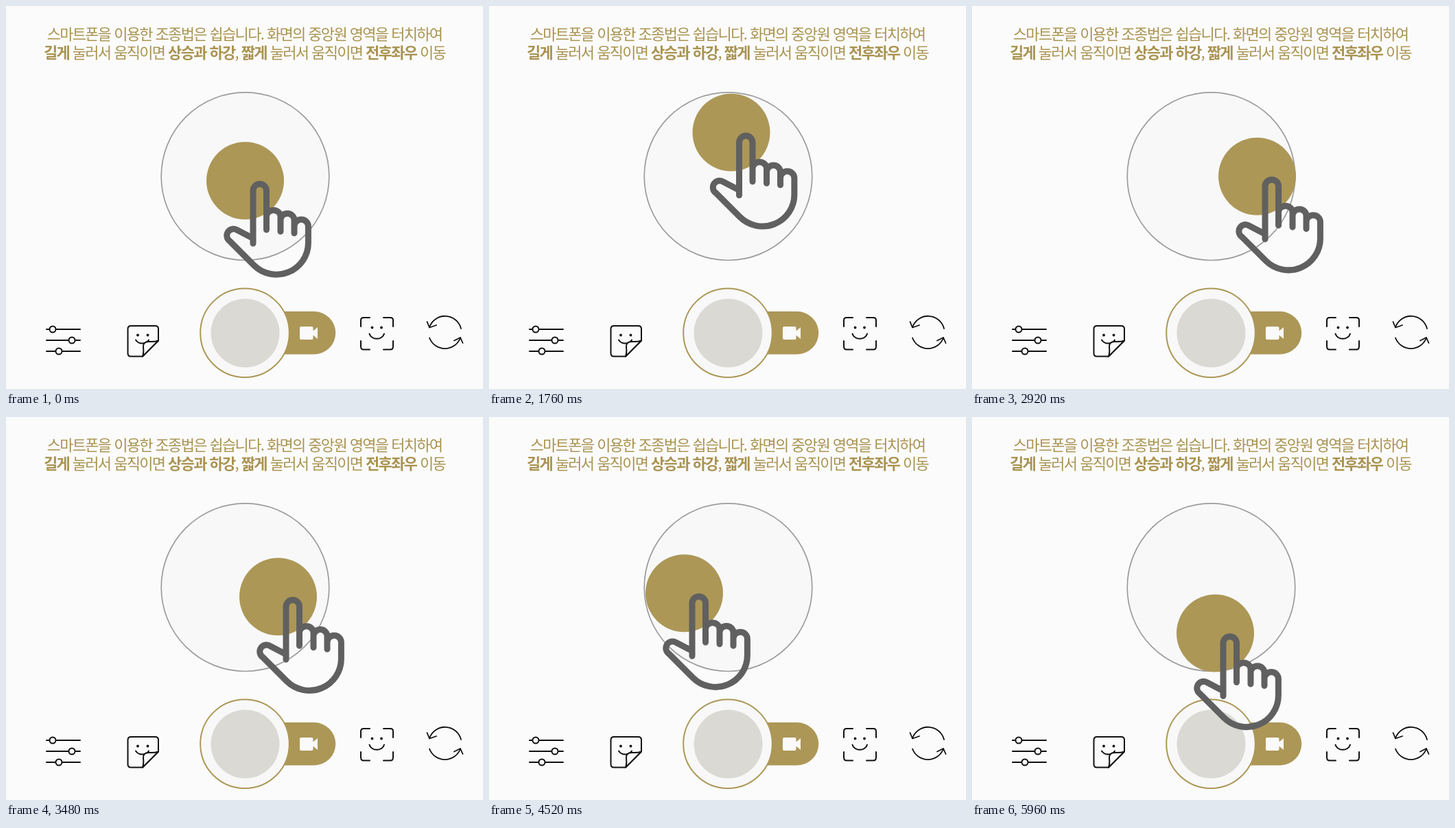
Recreate the animation shown at these times as an HTML page with a canvas. Size 695x558 px, loop 6 s.

```html
<!DOCTYPE html>
<html lang="ko">
<head>
<meta charset="utf-8">
<style>
  html, body { margin: 0; width: 100%; height: 100%; overflow: hidden; background: #fbfbfb; }
  canvas { position: absolute; left: 0; top: 0; }
  p {
    position: absolute; left: 0; top: 26px; width: 695px; margin: 0;
    font: 300 22px/27px "Noto Sans CJK KR", "Noto Sans CJK", "Noto Sans KR", sans-serif;
    letter-spacing: -0.077em; word-spacing: 0.3px;
    text-align: center; white-space: nowrap; color: #a99350;
  }
  b { font-weight: 700; }
</style>
</head>
<body>
<canvas id="stage" width="695" height="558"></canvas>
<p>스마트폰을 이용한 조종법은 쉽습니다. 화면의 중앙원 영역을 터치하여<br><b>길게</b> 눌러서 움직이면 <b>상승과 하강</b>, <b>짧게</b> 눌러서 움직이면 <b>전후좌우</b> 이동</p>
<script>
const ctx = document.getElementById('stage').getContext('2d');
const LOOP = 6000, STEP = 40;
const BG = '#fbfbfb', PALE = '#f8f8f8', GOLD = '#ac9757', INK = '#111', GREY = '#606060';

// time, x, y of the knob
const path = [
  [0, 348.5, 254.5], [680, 345.5, 225], [1280, 344.5, 189.5], [1760, 353, 184.3],
  [1920, 360.5, 188], [2440, 395.7, 222.3], [2560, 402.7, 230.5], [2940, 415.8, 249],
  [3200, 414.5, 258.3], [3480, 396.5, 261.8], [3840, 353.5, 258.7], [4520, 284.5, 256.7],
  [4680, 282.6, 259.5], [5120, 298.5, 278.5], [5760, 349.5, 311.5], [5960, 354.5, 315]
];

// slope at a knot: the parabola through it and its neighbours
function slope(i, k) {
  const d = j => (path[j + 1][k] - path[j][k]) / (path[j + 1][0] - path[j][0]);
  const last = path.length - 1;
  if (i === 0) return d(0) * 0.6;
  if (i === last) return d(last - 1) * 0.5;
  const a = path[i][0] - path[i - 1][0], b = path[i + 1][0] - path[i][0];
  return (d(i - 1) * b + d(i) * a) / (a + b);
}

function knobAt(t) {
  let i = 0;
  while (i < path.length - 2 && t > path[i + 1][0]) i++;
  const h = path[i + 1][0] - path[i][0], u = (t - path[i][0]) / h, v = 1 - u;
  return [1, 2].map(k =>
    v * v * (1 + 2 * u) * path[i][k] + u * u * (3 - 2 * u) * path[i + 1][k] +
    h * u * v * (v * slope(i, k) - u * slope(i + 1, k)));
}

function disc(x, y, r, fill, line, width) {
  ctx.beginPath();
  ctx.arc(x, y, r, 0, 7);
  if (fill) { ctx.fillStyle = fill; ctx.fill(); }
  if (line) { ctx.strokeStyle = line; ctx.lineWidth = width; ctx.stroke(); }
}

function draw(d, line, width, fill) {
  const p = new Path2D(d);
  if (fill) { ctx.fillStyle = fill; ctx.fill(p); }
  if (line) { ctx.strokeStyle = line; ctx.lineWidth = width; ctx.stroke(p); }
}

function sliders() {
  for (const [y, x] of [[471, 68], [487, 96], [503, 77]]) {
    draw(`M59 ${y}H108`, INK, 2);
    disc(x, y, 4.5, BG, INK, 2);
  }
}

function sticker() {
  draw('M199 510.5H182Q177.5 510.5 177.5 506V470.5Q177.5 466 182 466H217.5Q222 466 222 470.5V487.5Z', INK, 2);
  draw('M189 486.5Q192 491.5 198.5 491.500Q205 491.500 208 486.500', INK, 2);
  draw('M199 510.500Q201 505 200 497Q199.500 489 208 489Q217 489.500 222 487.500Z', INK, 2, BG);
  disc(192, 479.5, 1.9, INK);
  disc(206.5, 479.5, 1.9, INK);
}

function shutter() {
  draw('M380 445H449A31.25 31.25 0 0 1 449 507.5H380Z', null, 0, GOLD);
  disc(348, 476.2, 64.8, PALE, GOLD, 2);
  disc(348.5, 476.5, 50, '#dad9d3');
  draw('M430 467H445.5Q447.5 467 447.5 469V473.5L454 468V485L447.5 479.5V484Q447.5 486 445.5 486H430Q428 486 428 484V469Q428 467 430 467Z', null, 0, '#fafafa');
}

function faceScan() {
  draw('M517 467V458Q517 454 521 454H530M550 454H560Q564 454 564 458V467M564 488V496Q564 500.5 560 500.5H550M530 500.5H521Q517 500.5 517 496V488', INK, 2);
  draw('M529.5 477.5A11 9.300 0 0 0 551 477.5', INK, 2);
  disc(533.5, 468.5, 1.9, INK);
  disc(547, 468.5, 1.9, INK);
}

function refresh() {
  draw('M617 468A24 24 0 0 1 663 470M662 483.500A24 24 0 0 1 617 483.500', INK, 1.8);
  draw('M613.5 460L617 468.500L627 465M653 487.5L662 483L665.5 491', INK, 1.8);
}

// outlined hand placed for a knob centred on (348.5, 254.5)
function hand() {
  draw('M360 346V269a9.75 9.75 0 0 1 19.5 0V326M379.5 307a10.25 9.5 0 0 1 20.5 0V328.5M400 312a10 9.7 0 0 1 20 0V331M420 321a10.2 10 0 0 1 20.4 0V345A46.4 46 0 0 1 361 377.500L326 342.500A9.5 9.5 0 0 1 337 326.500L360 338.500', GREY, 9);
}

function render(time) {
  const t = Math.floor(time % LOOP / STEP) * STEP;
  const [x, y] = knobAt(t);
  ctx.lineCap = ctx.lineJoin = 'round';
  ctx.fillStyle = BG;
  ctx.fillRect(0, 0, 695, 558);
  disc(348.5, 248.2, 122.3, PALE, '#9c9c9c', 1.7);
  sliders();
  sticker();
  shutter();
  faceScan();
  refresh();
  disc(x, y, 56.5, GOLD);
  ctx.save();
  ctx.translate(x - 348.5, y - 254.5);
  hand();
  ctx.restore();
}

const start = performance.now();
function tick() {
  render(performance.now() - start);
  requestAnimationFrame(tick);
}
tick();
</script>
</body>
</html>
```
